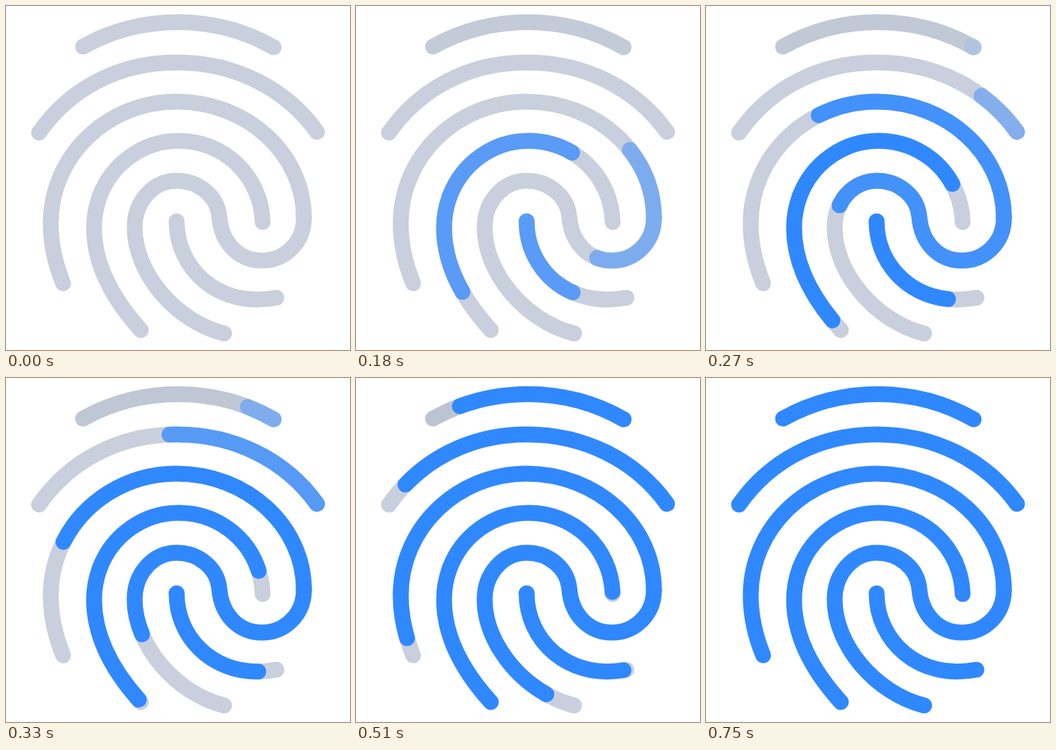
Recreate the animation shown at these times as an HTML page. Size 500x500 px, loop 0.81 s.

```html
<!DOCTYPE html>
<html lang="en">
<head>
<meta charset="utf-8">
<title>Fingerprint scan</title>
<style>
  html, body { margin: 0; width: 100%; height: 100%; overflow: hidden; background: #fff; }
  svg { display: block; width: 100%; height: 100%; }
  path { fill: none; stroke-width: 23; stroke-linecap: round; }
</style>
</head>
<body>
<svg id="stage" viewBox="0 0 500 500"></svg>
<script>
const LOOP = 810, STEP = 30;
const GRAY = [201, 207, 220], DARK_GRAY = [188, 196, 210], BLUE = [48, 136, 255];

// Each ridge grows from its first point: start and duration in ms,
// ease handles [x1, x2] and the length of the colour fade.
const ridges = [
  { d: 'M389 60C347 36 300 23.5 250 23.5C200 23.5 153 36 112 59',
    start: 240, duration: 520, ease: [.356, .09], fade: 185, darkens: true },
  { d: 'M452 183C407 120 333 82 248 82C163 82 92 121 48 184',
    start: 180, duration: 550, ease: [.34, .03], fade: 200 },
  { d: 'M433 308C433 214.7 350 139 248 139C147 139 65 218 65 316C65 347 72 376 83 403',
    start: 60, duration: 615, ease: [.37, .14], fade: 240 },
  { d: 'M433 308C433 343 406 370 372 370C338 370 313 344 310 306C307 276 280 254 248 254' +
       'C214 254 187 284 187 322C187 388 246 458 317 476',
    start: 60, duration: 735, ease: [.31, .026], fade: 240 },
  { d: 'M136 277C154 229 199 196 251 196C318 196 371 248 373 314',
    start: 0, duration: 605, ease: [.3, 0], fade: 245 },
  { d: 'M136 277C131 291 128 306 128 322C128 379 157 428 196 471',
    start: 0, duration: 400, ease: [.35, .27], fade: 245 },
  { d: 'M248 313C248 382 309 440 393 424',
    start: 0, duration: 660, ease: [.25, 0], fade: 245 }
];

const stage = document.getElementById('stage');
const clamp = v => Math.min(1, Math.max(0, v));
const mix = (a, b, k) => `rgb(${a.map((v, i) => Math.round(v + (b[i] - v) * k))})`;

// cubic-bezier(x1, 0, x2, 1)
function bezierEase(x, [x1, x2]) {
  let low = 0, high = 1, u;
  for (let i = 0; i < 24; i++) {
    u = (low + high) / 2;
    const v = 1 - u;
    if (3 * u * v * v * x1 + 3 * u * u * v * x2 + u ** 3 < x) low = u;
    else high = u;
  }
  return u * u * (3 - 2 * u);
}

function addPath(d) {
  const path = document.createElementNS('http://www.w3.org/2000/svg', 'path');
  path.setAttribute('d', d);
  path.setAttribute('pathLength', 1);
  path.style.stroke = mix(GRAY, GRAY, 0);
  return stage.appendChild(path);
}

for (const ridge of ridges) ridge.base = addPath(ridge.d);
for (const ridge of ridges) ridge.line = addPath(ridge.d);

function draw(time) {
  for (const { start, duration, ease, fade, darkens, base, line } of ridges) {
    const age = time - start;
    const grown = bezierEase(clamp(age / duration), ease);
    line.style.display = age > 0 ? '' : 'none';
    line.style.strokeDasharray = grown > .998 ? 'none' : `${grown} 2`;
    line.style.stroke = mix(GRAY, BLUE, clamp(age / fade));
    if (darkens) base.style.stroke = mix(GRAY, DARK_GRAY, clamp(time / 450));
    base.style.display = grown > .998 ? 'none' : '';
  }
}

function tick() {
  draw(Math.floor(performance.now() % LOOP / STEP) * STEP);
  requestAnimationFrame(tick);
}
tick();
</script>
</body>
</html>
```
